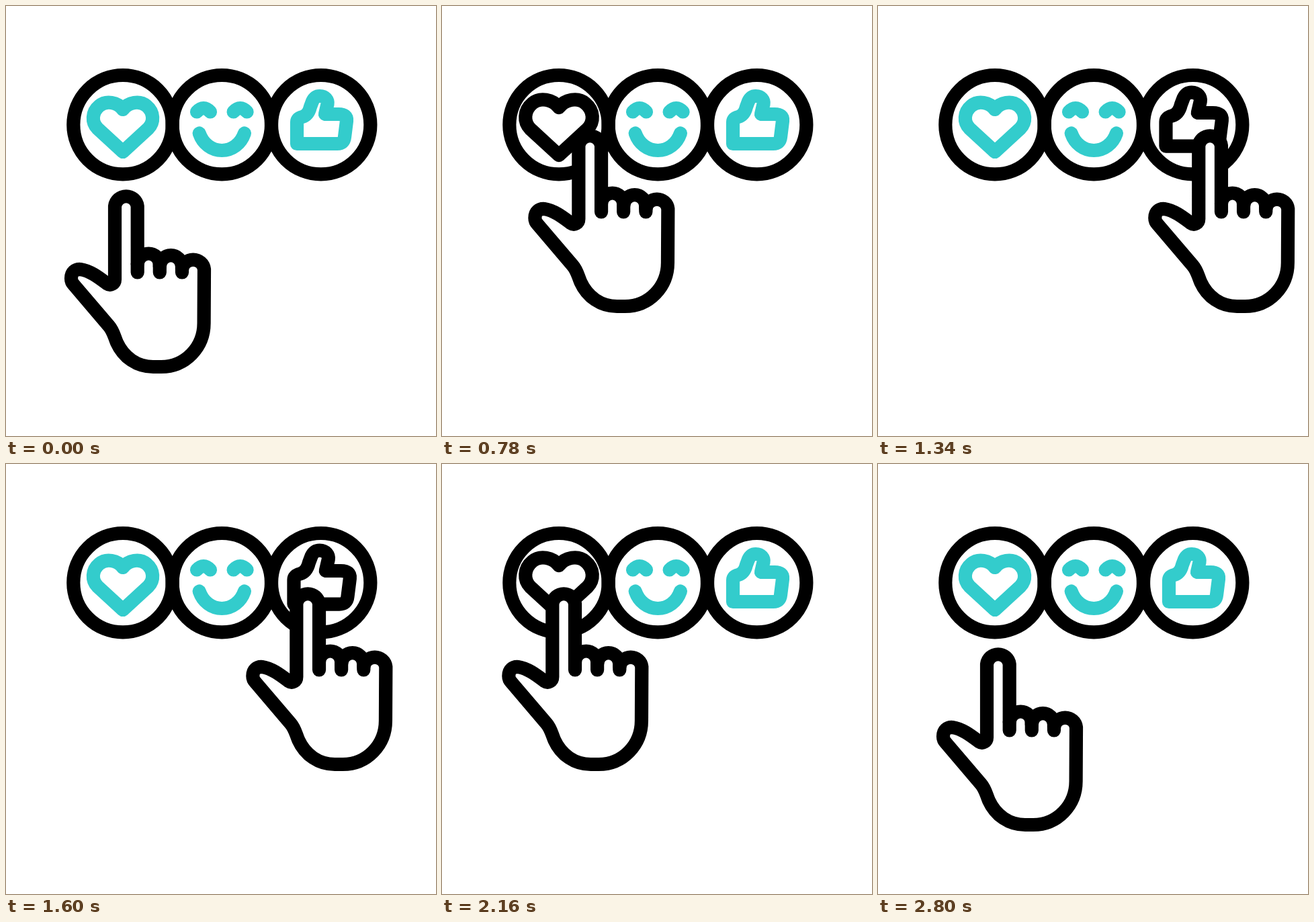
An HTML page with a canvas that plays this animation: 640x640 px, repeating every 3.6 s.

```html
<!DOCTYPE html>
<html lang="en">
<head>
<meta charset="utf-8">
<title>Reactions</title>
<style>
  html, body { margin: 0; width: 100%; height: 100%; overflow: hidden; background: #fff; }
  canvas { display: block; width: 640px; height: 640px; }
</style>
</head>
<body>
<canvas id="stage" width="640" height="640"></canvas>
<script>
const ctx = document.getElementById('stage').getContext('2d');
const BLACK = '#000', TEAL = '#33cccc', LINE = 20.2;
const LOOP = 3600, MOVE = 2800, HALF = MOVE / 2, STEP = 20;
const RING_Y = 176.7, RING_R = 73.7, GROW = 1.127;

// Each icon lights up while the outward time lies in [from, to)
const icons = [
  { x: 174, from: 400, to: 840, path: new Path2D(
    `M174 154 C166 143 149 140 139 148.5 C127.5 158 127 173 136.5 182.5
     L174 217 L211.5 182.5 C221 173 220.5 158 209 148.5 C199 140 182 143 174 154 Z`) },
  { x: 321.3, from: 840, to: 1100, path: new Path2D(
    `M284 157.5 Q294 146.5 304 157.5 M338.6 157.5 Q348.6 146.5 358.6 157.5
     M287.7 189.5 C293 205 306 215 321.3 215 C336.6 215 349.6 205 354.9 189.5`) },
  { x: 468.7, from: 1100, to: Infinity, path: new Path2D(
    `M433 205 V173 Q433 167 441 165 Q450 162.5 453 150 L456 142
     C459 135.5 463 134 467 134 C475 134 479.5 140 478.5 146 L475 161
     H495 Q508 161 507 171 L504 195 Q503 205 493 205 Z`) }
];

const hand = new Path2D(
  `M162 298 A17 17 0 0 1 195.7 298 V384
   A16.6 16.8 0 0 1 228.8 384 V388 A16.6 16.8 0 0 1 262 388 V392
   A16.6 16.2 0 0 1 295 392 L294.6 472
   C294.6 508 267 537 231 537 H219 C195 537 175 523 165 501
   C161 492 160 484 153 476 L101 415
   C98 412 97 409 97 405.5 C97 396 103 391.5 111 392
   C125 394 138 404 150 413 C156 417 162 413 162 407 Z`);
const knuckles = new Path2D('M195.7 384 V396.5 M228.8 384 V396.5 M262 388 V396.5');

function handX(t) {
  const p = Math.min(Math.max((t - 600) / 800, 0), 1);
  return 320.4 * p * p * (3 - 2 * p);
}

// Short dip, then a steady rise that stops at 600 ms
function handY(t) {
  const join = 203, speed = 0.25;
  const rise = s => -90 + speed * Math.max(600 - s, 0);
  if (t >= join) return rise(t);
  const u = t / join;
  return u * u * ((3 - 2 * u) * rise(join) + (1 - u) * speed * join);
}

function drawIcon(icon, t) {
  const on = t >= icon.from && t < icon.to;
  const k = on ? GROW : 1;
  ctx.save();
  ctx.translate(icon.x, RING_Y);
  ctx.scale(k, k);
  ctx.translate(-icon.x, -RING_Y);
  ctx.lineWidth = LINE / k;
  ctx.strokeStyle = on ? BLACK : TEAL;
  ctx.stroke(icon.path);
  ctx.restore();
}

function drawRing(x) {
  ctx.beginPath();
  ctx.arc(x, RING_Y, RING_R, 0, Math.PI * 2);
  ctx.stroke();
}

function drawHand(t) {
  ctx.save();
  ctx.translate(handX(t), handY(t));
  ctx.fill(hand);
  ctx.stroke(hand);
  ctx.stroke(knuckles);
  ctx.restore();
}

function draw(ms) {
  const step = Math.floor((ms % LOOP) / STEP) * STEP;
  const t = HALF - Math.abs(HALF - Math.min(step, MOVE));
  ctx.fillStyle = '#fff';
  ctx.fillRect(0, 0, 640, 640);
  ctx.lineCap = ctx.lineJoin = 'round';
  ctx.lineWidth = LINE;
  ctx.strokeStyle = BLACK;
  for (const icon of icons) drawRing(icon.x);
  for (const icon of icons) drawIcon(icon, t);
  drawHand(t);
}

let start;
function tick(now) {
  if (start === undefined) start = now;
  draw(now - start);
  requestAnimationFrame(tick);
}
draw(0);
requestAnimationFrame(tick);
</script>
</body>
</html>
```
